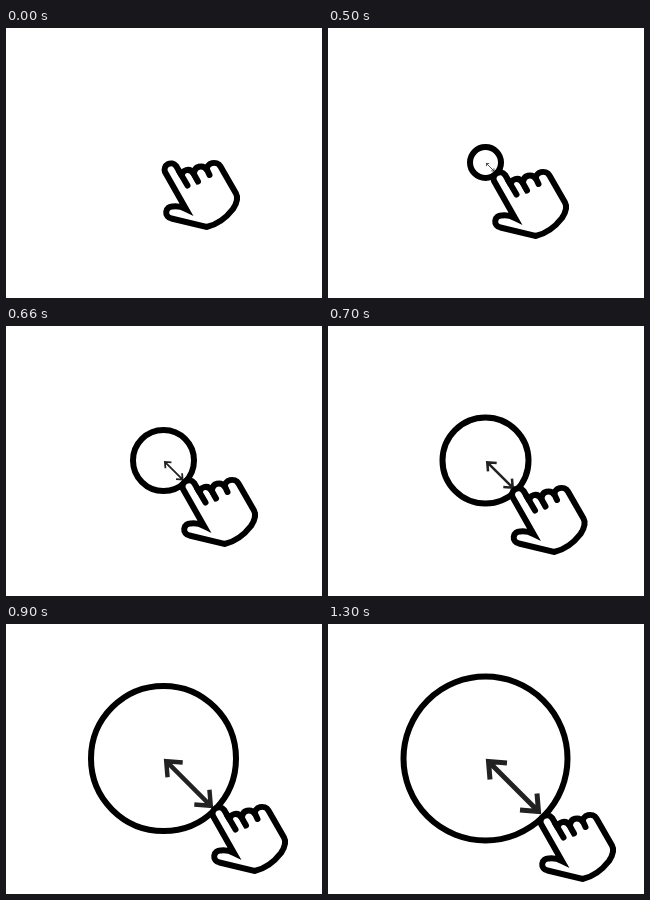
Animation of 316 by 270 pixels, one loop 1500 ms. Source, as an HTML page:

```html
<!DOCTYPE html>
<html lang="en">
<head>
<meta charset="utf-8">
<title>Drag to resize a circle</title>
<style>
  html, body { margin: 0; height: 100%; overflow: hidden; background: #fff; }
  svg { display: block; width: 100vw; height: 100vh; }
</style>
</head>
<body>
<svg viewBox="0 0 316 270" fill="none" stroke="#000" stroke-width="6">
  <g id="drawing">
    <circle id="circle" cx="157.5" cy="134.5" fill="#fff"/>
    <path id="arrow" stroke="#222" stroke-width="5"
      d="M3 3L52 52M21 4L2.5 2.5L4 20.5M34 51L52.5 52.5L51 34.5"/>
  </g>
  <g id="hand">
    <path fill="#fff" d="M180 181L159 144A6.4 6.4 0 0 1 170 137.8L176 148
      C175 142 184 139 188 146C188 138 197 136 201 142C200 135 211 132 214.5 138.5
      L230 165.5C232 169 231 175 227 181C220 190 210 197 200.5 199
      L165.5 190.5A6 6 0 0 1 167 178.5C171 178 176 179 180 181Z"/>
    <path stroke-linecap="round" d="M173 143L181.5 157.5M187 144.5L192 153.5M200 139.5L203.5 147"/>
  </g>
</svg>
<script>
  // Each step: hand x, hand y, circle radius, arrow size
  const steps = [
    [0, 0, 0, 0],
    [7, 9, 15.5, 8.5],
    [18, 19, 30.5, 19.5],
    [25.5, 27, 43, 28],
    [37, 37, 58, 38],
    [48, 48, 72.5, 49],
    [54, 56, 82, 55]
  ];
  const [drawing, circle, arrow, hand] =
    ["drawing", "circle", "arrow", "hand"].map(id => document.getElementById(id));

  function draw(now) {
    const t = now % 1500;
    const i = t < 500 ? 0 : Math.min(6, Math.floor((t - 400) / 100));
    const [x, y, radius, size] = steps[i];
    drawing.style.display = i ? "" : "none";
    circle.setAttribute("r", radius);
    arrow.setAttribute("transform", `translate(158 135) scale(${size / 55})`);
    hand.setAttribute("transform", `translate(${x} ${y})`);
    requestAnimationFrame(draw);
  }
  draw(performance.now());
</script>
</body>
</html>
```
